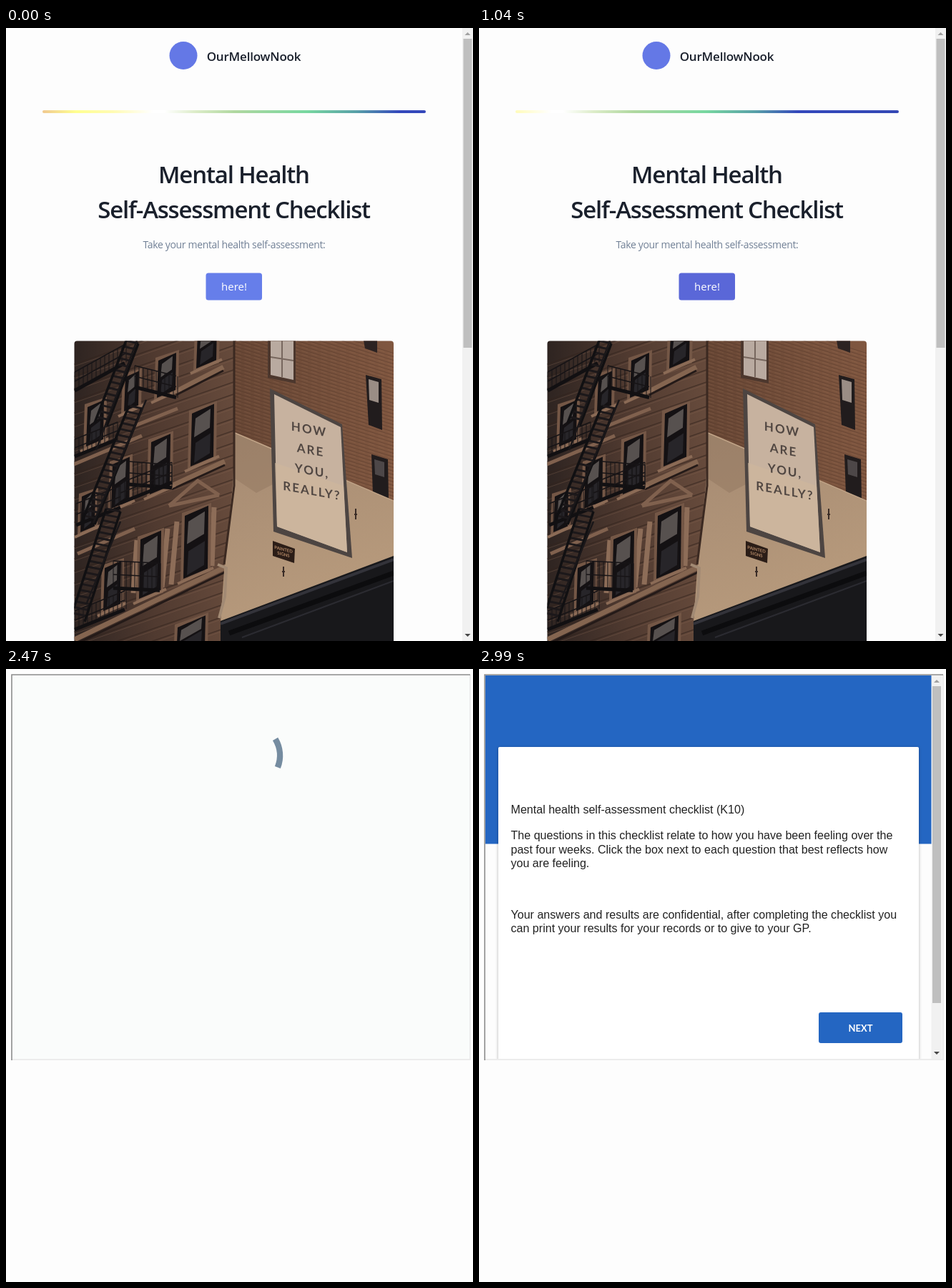
An HTML page for the animation above (5200 ms loop, 653 by 857 pixels).

```html
<!DOCTYPE html>
<html lang="en">
<head>
<meta charset="utf-8">
<style>
html, body { margin: 0; width: 100%; height: 100%; overflow: hidden; background: #fdfdfd; }
svg { display: block; width: 653px; height: 857px; }
text { white-space: pre; }
.ui { font-family: "Open Sans", "Noto Sans", sans-serif; text-anchor: middle; }
.title { font-size: 33px; font-weight: 600; letter-spacing: -1.2px; fill: #1a202c; }
.form { font: 16.07px "Liberation Sans", Arial, sans-serif; fill: #222; }
.next { font: 700 13px Lato, sans-serif; text-anchor: middle; fill: #fff; }
.mural { font: 700 17px Lato, sans-serif; letter-spacing: 2px; text-anchor: middle; fill: #514742; }
</style>
</head>
<body>
<svg id="stage" viewBox="0 0 653 857"></svg>
<script>
const LOOP = 5200, STEP = 130;

const poly = (points, fill, extra = '') => `<polygon points="${points}" fill="${fill}" ${extra}/>`;
const rect = (x, y, w, h, fill, extra = '') =>
  `<rect x="${x}" y="${y}" width="${w}" height="${h}" fill="${fill}" ${extra}/>`;
const path = (d, stroke, width = 1, extra = '') =>
  `<path d="${d}" fill="none" stroke="${stroke}" stroke-width="${width}" ${extra}/>`;
const text = (x, y, cls, str, extra = '') => `<text x="${x}" y="${y}" class="${cls}" ${extra}>${str}</text>`;
const times = (n, fn) => Array.from({ length: n }, (_, i) => fn(i)).join('');

function scrollbar(x, y, w, h, thumbY, thumbH) {
  const c = x + w / 2;
  return rect(x, y, w, h, '#f1f1f1') + rect(x + 1.5, thumbY, w - 3, thumbH, '#bfbfbf') +
    poly(`${c - 4},${y + 10} ${c},${y + 6} ${c + 4},${y + 10}`, '#a0a0a0') +
    poly(`${c - 4},${y + h - 10} ${c},${y + h - 6} ${c + 4},${y + h - 10}`, '#454545');
}

// Sash window on the left facade: foot of the left edge, leaning with the perspective
function sash(x, y, w, h) {
  const rise = w * 0.42;
  const shape = (dx, dy, hh) => {
    const l = x + dx, r = x + w - dx, b = y - dy;
    return `${l + 2},${b - hh} ${r + 1},${b - hh - rise} ${r},${b - rise} ${l},${b}`;
  };
  return poly(shape(-4, -4, h + 8), '#745746') + poly(shape(0, 0, h), '#141113') +
    poly(shape(5, h * 0.55, h * 0.36), '#57514f') + poly(shape(5, 5, h * 0.38), '#272529') +
    path(`M${x - 8} ${y + 7}L${x + w + 8} ${y - rise - 1}`, '#8b6b56', 4);
}

// Balcony railing of the fire escape
function railing(x, y, w, h, slope) {
  const bars = times(Math.round(w / 6) + 1, i => `M${x + i * 6} ${y + i * 6 * slope}v${h}`);
  const rail = dy => `M${x} ${y + dy}l${w} ${w * slope}`;
  return path(bars, '#171416', 1) + path(rail(0) + rail(h / 2), '#171416', 1.6) + path(rail(h), '#121012', 5);
}

function stairs(x1, y1, x2, y2, w) {
  const n = Math.round((y2 - y1) / 8);
  const steps = times(n, i => `M${x1 + (x2 - x1) * i / n} ${y1 + (y2 - y1) * i / n}l${w} 4`);
  const rails = `M${x1} ${y1}L${x2} ${y2}M${x1 + w} ${y1 + 4}L${x2 + w} ${y2 + 4}`;
  return path(steps, '#1c181a', 3) + path(rails, '#111012', 3.5);
}

function photo() {
  const facade = rect(95, 437, 227, 420, 'url(#facade)') +
    path(times(34, i => `M95 ${470 + i * 17}L321 ${392 + i * 17}`), '#32231d', 1.4, 'opacity=".6"') +
    path(times(34, i => `M95 ${473 + i * 17}L321 ${395 + i * 17}`), '#8a6854', 1, 'opacity=".35"');
  const trim =
    path('M100 735L180 700M95 610L190 570M180 556L240 532M228 668L268 633L298 653M228 668L298 653', '#80614e', 5) +
    path('M96 855L310 752M232 640L306 606M238 508L304 474', '#846550', 7) +
    path('M96 862L310 759M232 645L306 611M238 513L304 479', '#241a18', 3) +
    path('M239 690L231 778M291 670L288 752M226 700L218 782M183 716L178 790', '#8d6d58', 7);
  const windows = [
    [266, 476, 28, 50], [258, 613, 32, 74], [248, 770, 34, 88], [201, 652, 28, 73], [211, 517, 26, 52],
    [186, 798, 30, 83], [238, 880, 40, 42], [147, 672, 25, 62], [165, 536, 20, 48], [112, 585, 24, 55],
    [136, 815, 24, 60], [104, 705, 20, 50]
  ].map(w => sash(...w)).join('');
  const escape = railing(96, 481, 70, 26, -0.55) + railing(180, 472, 58, 30, 0.25) + railing(96, 575, 60, 24, -0.4) +
    railing(172, 606, 60, 32, 0.08) + railing(98, 665, 62, 30, -0.4) + railing(160, 636, 72, 28, -0.4) +
    railing(150, 745, 65, 38, 0.05) + railing(96, 815, 70, 26, -0.4) +
    stairs(168, 437, 124, 552, 17) + stairs(172, 528, 106, 690, 18) + stairs(140, 672, 90, 826, 20) +
    path('M183 437L126 590M196 520L122 692M160 690L112 806', '#1a1719', 2.5);
  const brick = rect(320, 437, 223, 230, 'url(#brick)') +
    path(times(62, i => `M320 ${385 + i * 5}l223 70`), '#4a3026', 1, 'opacity=".38"') +
    path(times(62, i => `M320 ${387 + i * 5}l223 70`), '#a57a5f', 1, 'opacity=".2" stroke-dasharray="9 5"');
  const sideWindows =
    poly('366,434 405,434 405,497 366,489', '#4c372d') + poly('370,434 402,434 402,492 370,485', '#b9aaa0') +
    path('M370 460L402 465M386 437V488', '#77675e', 2) +
    poly('503,485 525,491 526,562 507,555', '#211c1d') + poly('507,491 521,495 521,524 508,520', '#9a8d85') +
    poly('511,596 534,603 535,661 513,652', '#211c1d') + poly('515,603 529,607 529,628 516,624', '#4d4748') +
    poly('500,437 519,437 519,454 502,448', '#2c2322');
  const wall = poly('320,566 542,661 542,739 300,830 306,745 317,640', 'url(#plaster)') +
    poly('320,566 373,590 373,638 350,650 320,630', '#8e745e', 'opacity=".45"') +
    path('M320 566L542 661', '#c1a487', 1.5) +
    path('M319 437L319 640L305 750', '#3b2921', 3) +
    path('M296 750l12 5l-2 40l-8 30', '#a28a74', 4);
  const sign = poly('369,504 470,554 484,741 374,704', '#4d4542') +
    poly('375,512 468,558 477,733 379,697', '#c7b29f') +
    poly('376,608 472,640 477,733 379,697', '#cfb79d', 'opacity=".7"');
  const words = [['HOW', 424, 567], ['ARE', 426, 596], ['YOU,', 428, 625], ['REALLY?', 428, 653]]
    .map(([s, x, y]) => text(0, 0, 'mural', s, `transform="translate(${x} ${y}) skewY(10)"`)).join('');
  const plaque = poly('373,717 404,728 403,748 373,738', '#2b1d17') +
    `<g transform="translate(388 731) skewY(14)" style="font:700 6px Lato,sans-serif;text-anchor:middle" fill="#b58a68">
     <text>PAINTED</text><text y="7">SIGNS</text></g>` +
    path('M388 753v14M386 760h4M489 672v15M487 680h4', '#3b2d27', 2);
  const roof = poly('300,829 542,738 542,857 300,857', '#18181b') +
    path('M300 833L542 743', '#33333a', 4) + path('M312 846L542 762', '#0c0c0e', 7) + path('M330 852L542 773', '#2b2b31', 2);
  return `<g clip-path="url(#photoClip)">${facade}${trim}${windows}${escape}${brick}${sideWindows}${wall}${sign}${words}${plaque}${roof}</g>`;
}

const barStops = [
  [0, '#e8b070'], [50, '#f0c890'], [98, '#ffff90'], [150, '#fffbb4'], [205, '#fff'], [222, '#fff'],
  [265, '#dcecc8'], [320, '#b0d8a0'], [420, '#78d8a0'], [490, '#58a0a8'], [550, '#3448bc'], [700, '#3448b4']
].map(([x, color]) => `<stop offset="${x / 700}" stop-color="${color}"/>`).join('');

const defs = `<defs>
  <linearGradient id="bar" gradientUnits="userSpaceOnUse" x1="0" x2="700">${barStops}</linearGradient>
  <linearGradient id="facade"><stop stop-color="#2e2421"/><stop offset=".5" stop-color="#503a30"/><stop offset="1" stop-color="#674b3c"/></linearGradient>
  <linearGradient id="brick"><stop stop-color="#684735"/><stop offset="1" stop-color="#805740"/></linearGradient>
  <linearGradient id="plaster" x2=".4" y2="1"><stop stop-color="#a58a72"/><stop offset="1" stop-color="#b79a7c"/></linearGradient>
  <clipPath id="photoClip"><rect x="95.5" y="437.5" width="446.5" height="440" rx="4"/></clipPath>
  <clipPath id="frameClip"><rect x="9" y="9" width="639" height="536"/></clipPath>
  <filter id="shadow" x="-5%" y="-5%" width="110%" height="115%"><feDropShadow dx="0" dy="1" stdDeviation="2" flood-opacity=".3"/></filter>
</defs>`;

const home = `<g id="home">
  <circle cx="248" cy="38.5" r="19.5" fill="#6478e6"/>
  ${text(346.5, 45.5, 'ui', 'OurMellowNook', 'font-size="17" font-weight="600" letter-spacing="-.2" fill="#1a202c"')}
  ${rect(51, 115, 536, 4, 'url(#bar)', 'rx="2"')}
  ${text(318.5, 217, 'ui title', 'Mental Health')}
  ${text(318.5, 265.5, 'ui title', 'Self-Assessment Checklist')}
  ${text(319, 307.5, 'ui', 'Take your mental health self-assessment:', 'font-size="14" letter-spacing="-.34" fill="#718096"')}
  ${rect(279.5, 342.5, 78.5, 38, '#667eea', 'rx="3.5" id="button"')}
  ${text(319, 367, 'ui', 'here!', 'font-size="15" fill="#fff"')}
  ${photo()}
  ${scrollbar(638, 0, 15, 857, 15, 432)}
</g>`;

const lines = [
  [202, 'Mental health self-assessment checklist (K10)'],
  [238, 'The questions in this checklist relate to how you have been feeling over the'],
  [257.5, 'past four weeks. Click the box next to each question that best reflects how'],
  [277, 'you are feeling.'],
  [348.5, 'Your answers and results are confidential, after completing the checklist you'],
  [368, 'can print your results for your records or to give to your GP.']
].map(([y, s]) => text(44.5, y, 'form', s)).join('');

const form = `<g id="form">
  <g clip-path="url(#frameClip)">
    ${rect(9, 9, 639, 536, '#fafafa', 'id="blank"')}
    <g id="loading">
      ${rect(9, 9, 639, 536, '#e3e5e4')}${rect(9, 9, 639, 235.5, '#205bad')}
      ${rect(27, 109, 603, 250, '#e3e5e4', 'rx="2" filter="url(#shadow)"')}
    </g>
    ${path('', '#758ca0', 8.5, 'id="spinner"')}
    <g id="ready">
      ${rect(9, 9, 639, 536, '#fdfdfd')}${rect(9, 9, 624, 235.5, '#2466c2')}
      ${rect(27, 109, 588, 460, '#fff', 'rx="2" filter="url(#shadow)"')}
      ${lines}
      ${rect(475, 480, 117, 43, '#2466c2', 'rx="3"')}${text(533.5, 507, 'next', 'NEXT')}
      ${scrollbar(632.5, 9, 15, 536, 24, 443)}
    </g>
  </g>
  ${path('M649 8V546H8', '#e8e8e8', 1.6)}${path('M8 547V8H649', '#8c8c8c', 1.6)}
</g>`;

const stage = document.getElementById('stage');
stage.innerHTML = defs + home + form;
const $ = id => document.getElementById(id);
const show = (id, on) => $(id).setAttribute('display', on ? 'inline' : 'none');

function arc(cx, cy, r, from, to) {
  const at = deg => {
    const a = deg * Math.PI / 180;
    return `${cx + r * Math.cos(a)} ${cy + r * Math.sin(a)}`;
  };
  return `M${at(from)}A${r} ${r} 0 ${to - from > 180 ? 1 : 0} 1 ${at(to)}`;
}

function draw(now) {
  const t = Math.floor(now % LOOP / STEP) * STEP;
  const loading = t >= 2600 && t < 2990, ready = t >= 2990;
  show('home', t < 1170);
  show('form', t >= 1170);
  show('loading', loading);
  show('ready', ready);
  show('spinner', t >= 2340 && !ready);

  $('bar').setAttribute('gradientTransform', `translate(${-0.1 * t})`);
  $('button').setAttribute('fill', t < 130 ? '#667eea' : t < 260 ? '#6073e1' : '#5a67d8');
  $('blank').setAttribute('fill', t < 2340 ? '#fafafa' : '#fafcfb');

  const turn = (t - (loading ? 2600 : 2340)) * 0.3;
  $('spinner').setAttribute('d', loading
    ? arc(327.5, 276.5, 40, -75 + turn, -46 + turn * 1.5)
    : arc(338, 121, 45, -70 + turn, -37 + turn * 1.5));
  requestAnimationFrame(draw);
}
requestAnimationFrame(draw);
</script>
</body>
</html>
```
